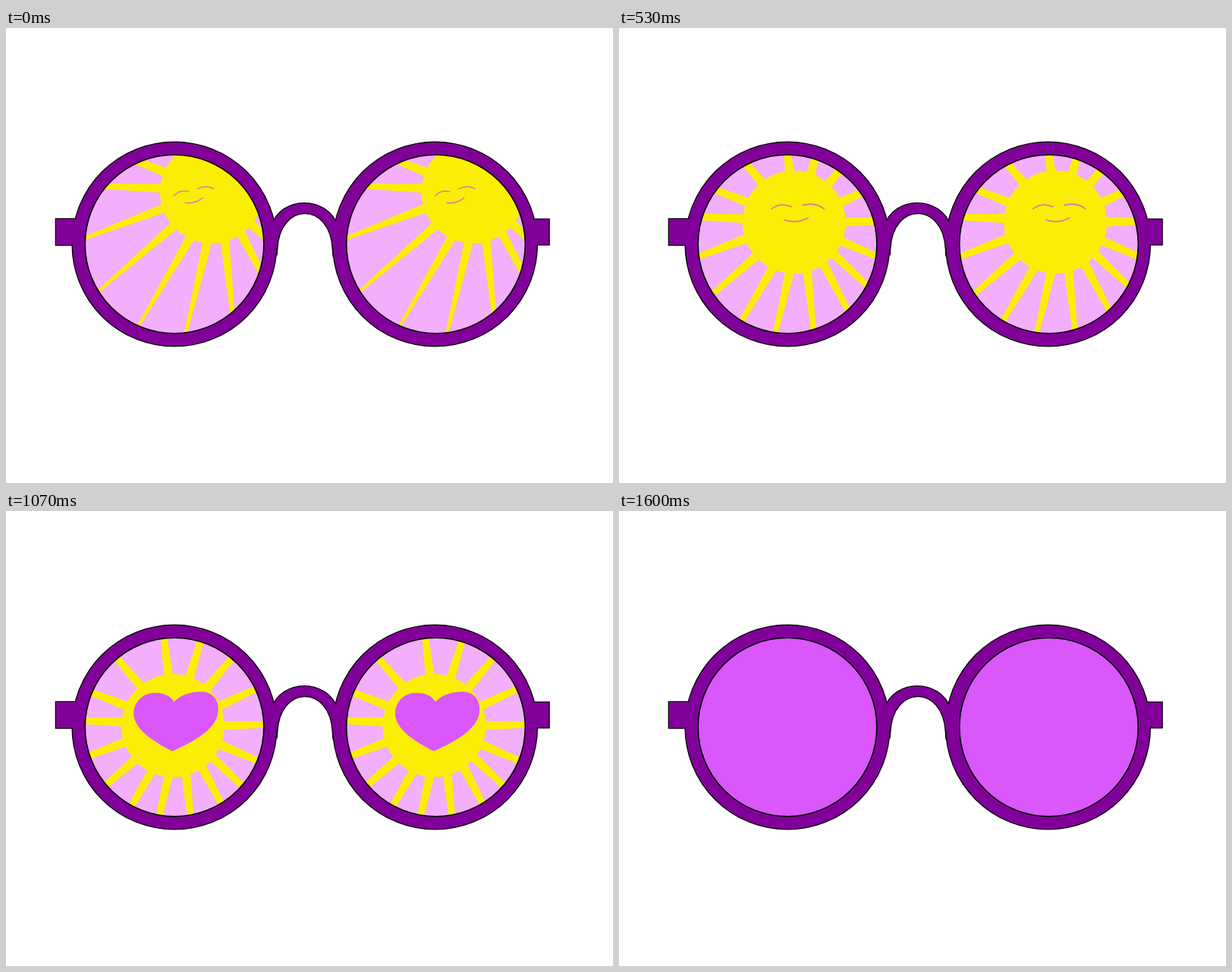
An HTML page with a canvas for the animation above (1940 ms loop, 800 by 600 pixels).

```html
<!DOCTYPE html>
<html>
<head>
<meta charset="utf-8">
<style>
  html, body { margin: 0; width: 100%; height: 100%; overflow: hidden; background: #fff; }
  canvas { display: block; }
</style>
</head>
<body>
<canvas id="stage" width="800" height="600"></canvas>
<script>
const ctx = document.getElementById('stage').getContext('2d');
const LOOP = 1940;
const LENS_GAP = 344.5;
const PURPLE = '#82009a', PINK = '#f3aefc', YELLOW = '#faee05', VIOLET = '#da57fb', BLUSH = '#e07aa0';
const RAY_ANGLES = [0, 22, 39, 55, 75, 95, 115, 138, 161, 184, 203, 231, 265, 289, 312, 337];

const sleepyFace = new Path2D('M-35 4Q-23 -6 -8 1M6 -1Q23 -6 35 4M-18 18Q-2 24 14 15');
const happyFace = new Path2D('M-29 8C-28 -5 -15 -10 -12 3M3 3C5 -8 20 -8 18 7M-16 16C-8 25 6 25 10 14');
const heart = new Path2D('M2 -33C-7 -50 -32 -51 -42 -49C-62 -45 -74 -27 -73 -9C-71 20 -32 43 -1 59' +
  'C35 43 80 20 84 -13C87 -35 75 -53 50 -52C30 -51 15 -46 2 -33Z');

const radians = degrees => degrees * Math.PI / 180;
const lerp = (a, b, p) => a + (b - a) * p;

const circle = (x, y, r) => {
  const path = new Path2D();
  path.arc(x, y, r, 0, Math.PI * 2);
  return path;
};
const lens = circle(222, 285, 117.8);
const frame = [
  circle(222, 285, 134.3),
  circle(565.5, 285, 134.3),
  new Path2D('M66 252H110V286H66Z'),
  new Path2D('M680 252.5H715.5V285.5H680Z'),
  new Path2D('M350 262C362 221 424 221 437 262L431 292C428 228 360 228 357 292Z')
];

// Tapered rays lean away from the radius most at the bottom of the sun
const sunburst = circle(0, 0, 68);
const ray = new Path2D('M-12 -6.3L150 -1.2V1.2L-12 6.3Z');
for (const angle of RAY_ANGLES) {
  const lean = 11 * Math.max(0, Math.cos(radians(angle - 80))) ** 2 - 2;
  sunburst.addPath(ray, new DOMMatrix().rotate(angle).translate(67, 0).rotate(lean));
}

// Fraction of evenly spaced poses reached, each shown on a 40 ms clock
function progress(t, start, end, steps) {
  let reached = 0;
  for (let i = 0; i < steps; i++) {
    const delay = Math.ceil(i * (end - start) / (steps - 1) / 40) * 40;
    if (t >= Math.min(end, start + delay)) reached++;
  }
  return reached / steps;
}

function drawSun(t) {
  const p = progress(t, 210, 650, 8);
  const turn = Math.min(1, p * 2);
  const size = lerp(0.78, 1, turn);
  ctx.save();
  ctx.translate(271 - 51 * (p - 0.04 * Math.sin(2 * Math.PI * p)), 216 + 67 * p ** 1.8);
  ctx.fillStyle = YELLOW;
  ctx.fill(sunburst);
  ctx.translate(lerp(-24, 5, turn), lerp(-2, -21, turn));
  ctx.rotate(radians(lerp(-10, 0, turn)));
  ctx.scale(size, size);
  ctx.strokeStyle = BLUSH;
  ctx.lineWidth = 1.8;
  ctx.stroke(t < 820 ? sleepyFace : happyFace);
  ctx.restore();
}

function drawHeart(t) {
  const grow = Math.sin(progress(t, 860, 1320, 6) * Math.PI / 2);
  const scale = grow * 6 ** progress(t, 1400, 1600, 4);
  if (!scale) return;
  ctx.translate(220, 275);
  ctx.scale(scale, scale);
  ctx.fillStyle = VIOLET;
  ctx.fill(heart);
}

function drawLens(t, offset) {
  ctx.save();
  ctx.translate(offset, 0);
  ctx.save();
  ctx.clip(lens);
  ctx.fillStyle = PINK;
  ctx.fill(lens);
  drawSun(t);
  drawHeart(t);
  ctx.restore();
  ctx.lineWidth = 1.6;
  ctx.stroke(lens);
  ctx.restore();
}

function draw(t) {
  ctx.clearRect(0, 0, 800, 600);
  ctx.strokeStyle = '#000';
  ctx.lineWidth = 2.6;
  frame.forEach(part => ctx.stroke(part));
  ctx.fillStyle = PURPLE;
  frame.forEach(part => ctx.fill(part));
  drawLens(t, 0);
  drawLens(t, LENS_GAP);
}

const start = performance.now();
function tick() {
  draw((performance.now() - start) % LOOP);
  requestAnimationFrame(tick);
}
tick();
</script>
</body>
</html>
```
